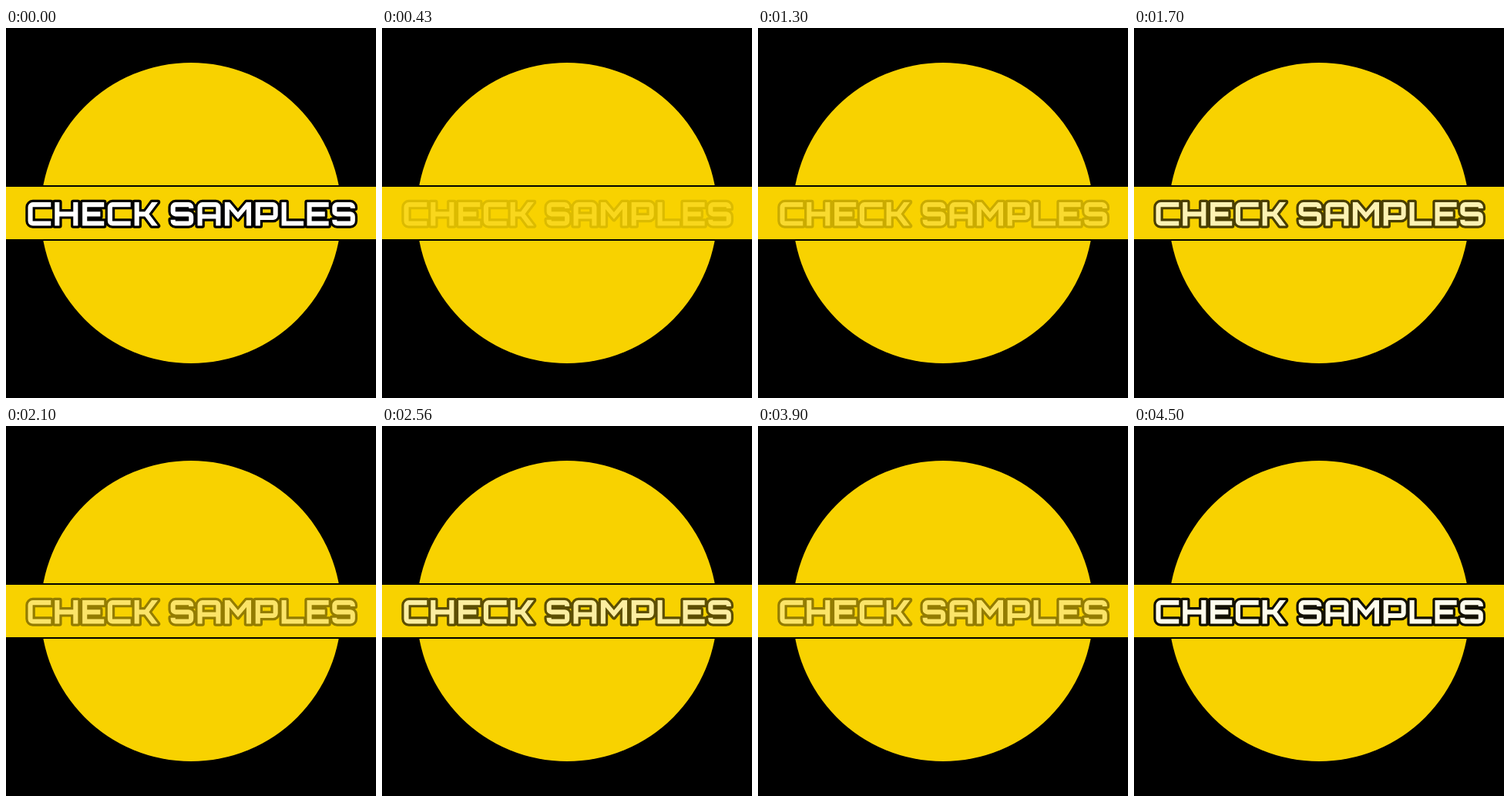
Write an HTML page with a canvas that moves like this. It is 480x480 px and loops after 4.56 s.

```html
<!DOCTYPE html>
<html lang="en">
<head>
<meta charset="utf-8">
<title>Check samples</title>
<style>
  html, body { margin: 0; width: 100%; height: 100%; overflow: hidden; background: #000; }
  canvas { display: block; width: 480px; height: 480px; }
</style>
</head>
<body>
<canvas id="stage" width="480" height="480" role="img" aria-label="CHECK SAMPLES">CHECK SAMPLES</canvas>
<script>
const ctx = document.getElementById('stage').getContext('2d');
const YELLOW = [248, 210, 0];
const LOOP = 4560, HOLD = 100, FPS = 15, FADE = 900;
const UNIT = 0.0424, PEN_X = 25.87, BASELINE = 256.6, CORNER = 147;

// Advance width and outline corners: "x,y" point, h/v axis move, trailing r = rounded corner.
const GLYPHS = {
  C: [814, '764,0 h62r v720r h764 v577 h206 v143 h764'],
  H: [846, '68,0 v720 h212 v432 h634 v720 h778 v0 h634 v288 h212 v0'],
  E: [778, '68,0 v720 h731 v577 h212 v432 h616 v288 h212 v143 h731 v0'],
  K: [796, '68,0 v720 h212 v432 h388 600,720 h785 512,360 785,0 h600 388,288 h212 v0'],
  S: [823, '62,188 v0r h760r v432r h206 v577 h616 v532 h760 v720r h62r v288r h616 v143 h206 v188'],
  A: [829, '62,0 v720r h767r v0 h623 v213 h206 v0|206,356 v577 h623 v356'],
  M: [938, '66,0 v720 h212 469,414 726,720 h872 v0 h728 v508 469,200 210,508 v0'],
  P: [799, '68,0 v720 h752r v179r h212 v0|212,323 v577 h608 v323'],
  L: [777, '68,0 v720 h212 v143 h738 v0'],
  ' ': [318, '']
};

function addContour(path, spec, penX) {
  let x = 0, y = 0;
  const points = spec.split(' ').map(token => {
    const [a, b] = token.match(/\d+/g).map(Number);
    if (token[0] === 'h') x = a;
    else if (token[0] === 'v') y = a;
    else [x, y] = [a, b];
    return {
      x: PEN_X + (penX + x) * UNIT,
      y: BASELINE - y * UNIT,
      r: token.endsWith('r') ? CORNER * UNIT : 0
    };
  });
  path.moveTo(points[0].x, points[0].y);
  for (let i = 1; i < points.length; i++) {
    const p = points[i], next = points[(i + 1) % points.length];
    if (p.r) path.arcTo(p.x, p.y, next.x, next.y, p.r);
    else path.lineTo(p.x, p.y);
  }
  path.closePath();
}

function layOut(text) {
  const path = new Path2D();
  let penX = 0;
  for (const char of text) {
    const [advance, outline] = GLYPHS[char];
    if (outline) outline.split('|').forEach(spec => addContour(path, spec, penX));
    penX += advance;
  }
  return path;
}

const label = layOut('CHECK SAMPLES');

const rgb = channels => `rgb(${channels.map(Math.round).join()})`;
const overYellow = (level, alpha) => rgb(YELLOW.map(c => c + (level - c) * alpha));

// Picture steps fall on a 10 ms grid after the first, longer hold.
function stepAt(time) {
  if (time < HOLD) return 0;
  const tick = Math.floor((time - HOLD) / 10) * 10 + 10;
  return Math.ceil(tick * FPS / 1000);
}

function draw(time) {
  const phase = (stepAt(time) * 1000 / FPS % FADE) / FADE;
  const alpha = Math.abs(1 - 2 * phase);

  ctx.fillStyle = '#000';
  ctx.fillRect(0, 0, 480, 480);
  ctx.fillStyle = rgb(YELLOW);
  ctx.beginPath();
  ctx.arc(240, 240, 195, 0, Math.PI * 2);
  ctx.fill();

  ctx.fillStyle = '#000';
  ctx.fillRect(0, 204, 480, 72);
  ctx.fillStyle = rgb(YELLOW);
  ctx.fillRect(0, 206, 480, 68);

  ctx.lineJoin = 'round';
  ctx.lineWidth = 6.4;
  ctx.strokeStyle = overYellow(0, alpha);
  ctx.stroke(label);
  ctx.fillStyle = overYellow(255, alpha);
  ctx.fill(label, 'evenodd');
}

const start = performance.now();
function frame() {
  draw((performance.now() - start) % LOOP);
  requestAnimationFrame(frame);
}
frame();
</script>
</body>
</html>
```
